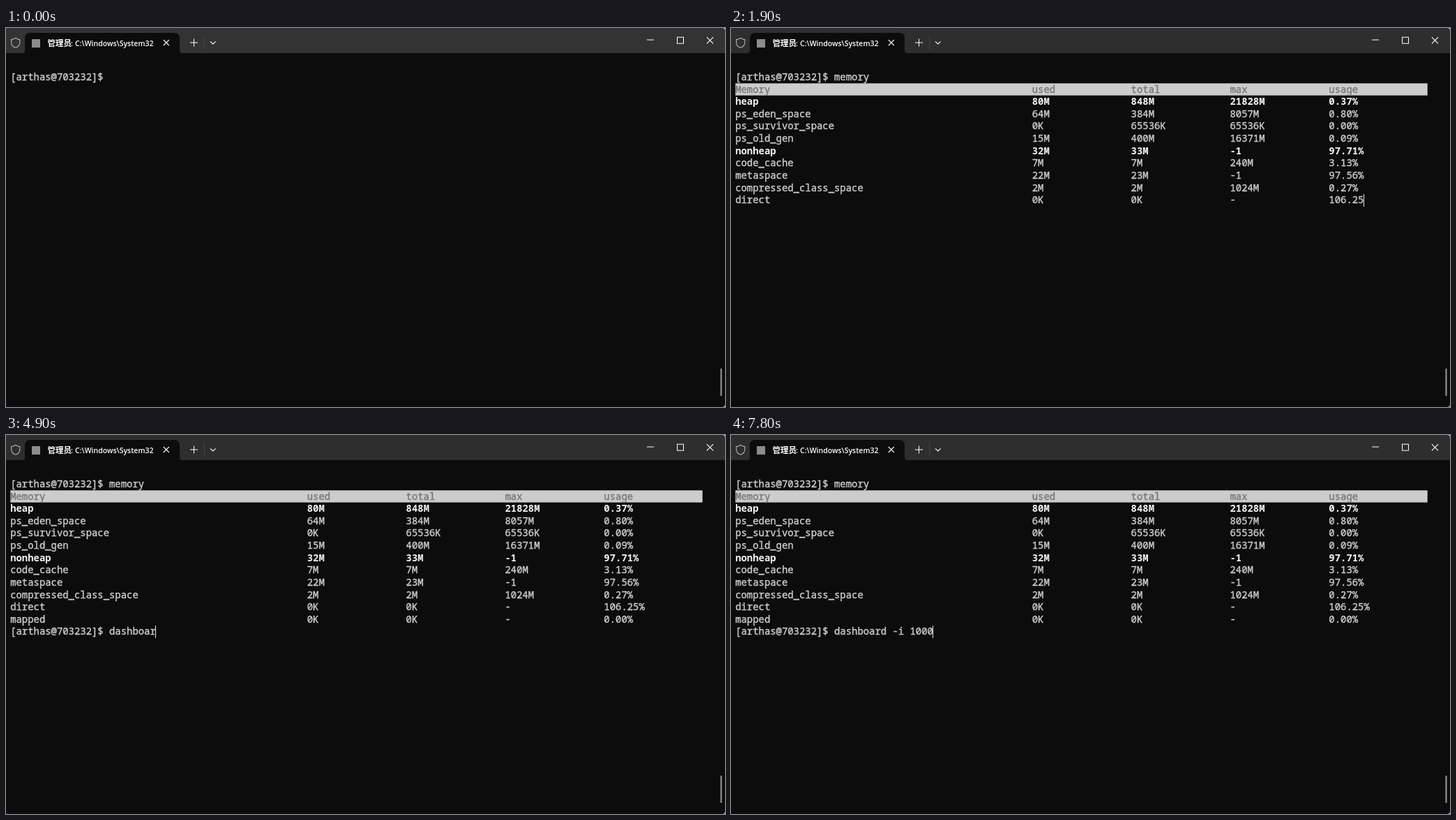
An HTML page with a canvas for the animation above (8 s loop, 1031 by 543 pixels).

```html
<!DOCTYPE html>
<html lang="zh">
<head>
<meta charset="utf-8">
<title>Terminal</title>
<style>
html, body { margin: 0; width: 100%; height: 100%; overflow: hidden; background: #0c0c0c; }
canvas { display: block; width: 1031px; height: 543px; }
</style>
</head>
<body>
<canvas id="stage" width="1031" height="543"></canvas>
<script>
const ctx = document.getElementById('stage').getContext('2d', { alpha: false });
const W = 1031, H = 543, LOOP = 8000, STEP = 100;
const BG = '#0c0c0c', FG = '#cccccc', BRIGHT = '#f2f2f2', DIM = '#767676', WHITE = '#fff';

// Character grid
const LEFT = 6.15, TOP = 61.4, CELL_W = 8.345, CELL_H = 17.62;
const MONO = '13.9px "Noto Sans Mono", "DejaVu Sans Mono", monospace';
const LATIN = '600 10.5px "Open Sans", sans-serif';
const CJK = '600 11.5px "Noto Sans CJK SC", "Noto Sans CJK", sans-serif';

const PROMPT = '[arthas@703232]$ ';
const MEMORY = `Memory used total max usage
heap 80M 848M 21828M 0.37%
ps_eden_space 64M 384M 8057M 0.80%
ps_survivor_space 0K 65536K 65536K 0.00%
ps_old_gen 15M 400M 16371M 0.09%
nonheap 32M 33M -1 97.71%
code_cache 7M 7M 240M 3.13%
metaspace 22M 23M -1 97.56%
compressed_class_space 2M 2M 1024M 0.27%
direct 0K 0K - 106.25%
mapped 0K 0K - 0.00%`;

const FOCUS = 170, ENTER = 1900, READY = 1930, DONE = 2000, BLINK = 530;

// Each burst types its text at an even pace.
const burst = (text, start, gap) => [...text].map((ch, i) => ({ ch, at: start + i * gap }));
const FIRST = [...burst('mem', 900, 150), ...burst('ory ', 1500, 0)];
const SECOND = [
  ...burst('dash', 3310, 125), ...burst('board ', 4100, 240),
  ...burst('-', 6000, 0), ...burst('i 1', 6405, 195), ...burst('000', 7500, 150)
];

function rect(x, y, w, h, color) {
  ctx.fillStyle = color;
  ctx.fillRect(x, y, w, h);
}

function line(color, width, ...points) {
  ctx.beginPath();
  points.forEach(([x, y]) => ctx.lineTo(x, y));
  ctx.strokeStyle = color;
  ctx.lineWidth = width;
  ctx.stroke();
}

function cross(x, y, r) {
  line(WHITE, 1.1, [x - r, y - r], [x + r, y + r]);
  line(WHITE, 1.1, [x - r, y + r], [x + r, y - r]);
}

function label(text, x, font) {
  ctx.font = font;
  ctx.fillStyle = WHITE;
  ctx.fillText(text, x, 26);
}

function print(text, col, row, color = FG, weight = 400) {
  ctx.font = weight + ' ' + MONO;
  ctx.fillStyle = ctx.strokeStyle = color;
  ctx.lineWidth = 0.4;
  const y = Math.round(TOP + row * CELL_H + 13.6);
  [...text].forEach((ch, i) => {
    const x = LEFT + (col + i) * CELL_W;
    ctx.fillText(ch, x, y);
    if (weight < 700) ctx.strokeText(ch, x, y);
  });
}

function cursor(col, row) {
  rect(Math.floor(LEFT + col * CELL_W), Math.round(TOP + row * CELL_H), 1, 18, '#e8e8e8');
}

// The cursor blinks from the latest key, or from when the line became ready.
function commandLine(keys, row, ready, end, t) {
  const typed = keys.filter(key => key.at <= t);
  const idle = t - (typed.length ? typed[typed.length - 1].at : ready);
  print(PROMPT + typed.map(key => key.ch).join(''), 0, row);
  if (idle >= 0 && t < end && Math.floor(idle / BLINK) % 2 === 0) {
    cursor(PROMPT.length + typed.length, row);
  }
}

function table(t) {
  // Output stops in the middle of a line before the rest arrives.
  const shown = t < DONE ? MEMORY.slice(0, MEMORY.lastIndexOf('%\n')) : MEMORY;
  const rows = shown.split('\n').map(row => row.split(' '));
  rect(6.3, 79.3, 992.4, 17.3, FG);
  rows.forEach((cells, i) => {
    const bold = cells[0].endsWith('heap');
    const color = i === 0 ? DIM : bold ? BRIGHT : FG;
    cells.forEach((cell, c) => print(cell, c && 34 + c * 17, i + 1, color, bold ? 700 : 400));
  });
  if (t < DONE) cursor(108, rows.length);
}

function tab() {
  ctx.beginPath();
  ctx.moveTo(23, 36);
  ctx.quadraticCurveTo(27, 36, 27, 32);
  ctx.arcTo(27, 7, 34, 7, 7);
  ctx.arcTo(249, 7, 249, 14, 7);
  ctx.lineTo(249, 32);
  ctx.quadraticCurveTo(249, 36, 253, 36);
  ctx.fillStyle = BG;
  ctx.fill();
  rect(37, 16, 12, 12, '#8c8c8c');
  label('管理员', 59.5, CJK);
  label(':', 93, LATIN);
  label('C:\\Windows\\System32', 99, LATIN);
  cross(229.8, 21, 4);
}

function shield() {
  const x = 13.7, r = 6.1;
  ctx.beginPath();
  for (const side of [-r, r]) {
    ctx.moveTo(x, 14.3);
    ctx.quadraticCurveTo(x + side / 2, 16.6, x + side, 16.6);
    ctx.lineTo(x + side, 20.5);
    ctx.quadraticCurveTo(x + side, 26, x, 28.3);
  }
  ctx.strokeStyle = '#b4b4b4';
  ctx.lineWidth = 1.1;
  ctx.stroke();
}

function titleBar(t) {
  rect(0, 0, W, 36, t < FOCUS ? '#333333' : '#2e2e2e');
  shield();
  tab();
  line(WHITE, 1, [264, 21], [275, 21]);
  line(WHITE, 1, [269.5, 15.5], [269.5, 26.5]);
  line('#424242', 1, [284.5, 11], [284.5, 31]);
  line(WHITE, 1.1, [293, 19.3], [296.8, 23], [300.6, 19.3]);
  line(WHITE, 1, [919, 17], [929, 17]);
  ctx.strokeRect(962.5, 13.2, 9, 9);
  cross(1009.5, 17.7, 4.6);
}

function corners() {
  ctx.beginPath();
  ctx.rect(0, 0, W, H);
  ctx.roundRect(0, 0, W, H, [0, 4, 4, 0]);
  ctx.fillStyle = '#d0d0d0';
  ctx.fill('evenodd');
}

function draw(t) {
  rect(0, 0, W, H, BG);
  titleBar(t);
  commandLine(FIRST, 0, FOCUS, ENTER, t);
  if (t >= ENTER) table(t);
  if (t >= DONE) commandLine(SECOND, 12, READY, LOOP, t);
  rect(1024.5, 488, 2, 39, '#9c9c9c');
  corners();
}

const start = performance.now();
function tick() {
  const t = (performance.now() - start) % LOOP;
  draw(Math.floor(t / STEP) * STEP);
  requestAnimationFrame(tick);
}
tick();
</script>
</body>
</html>
```
